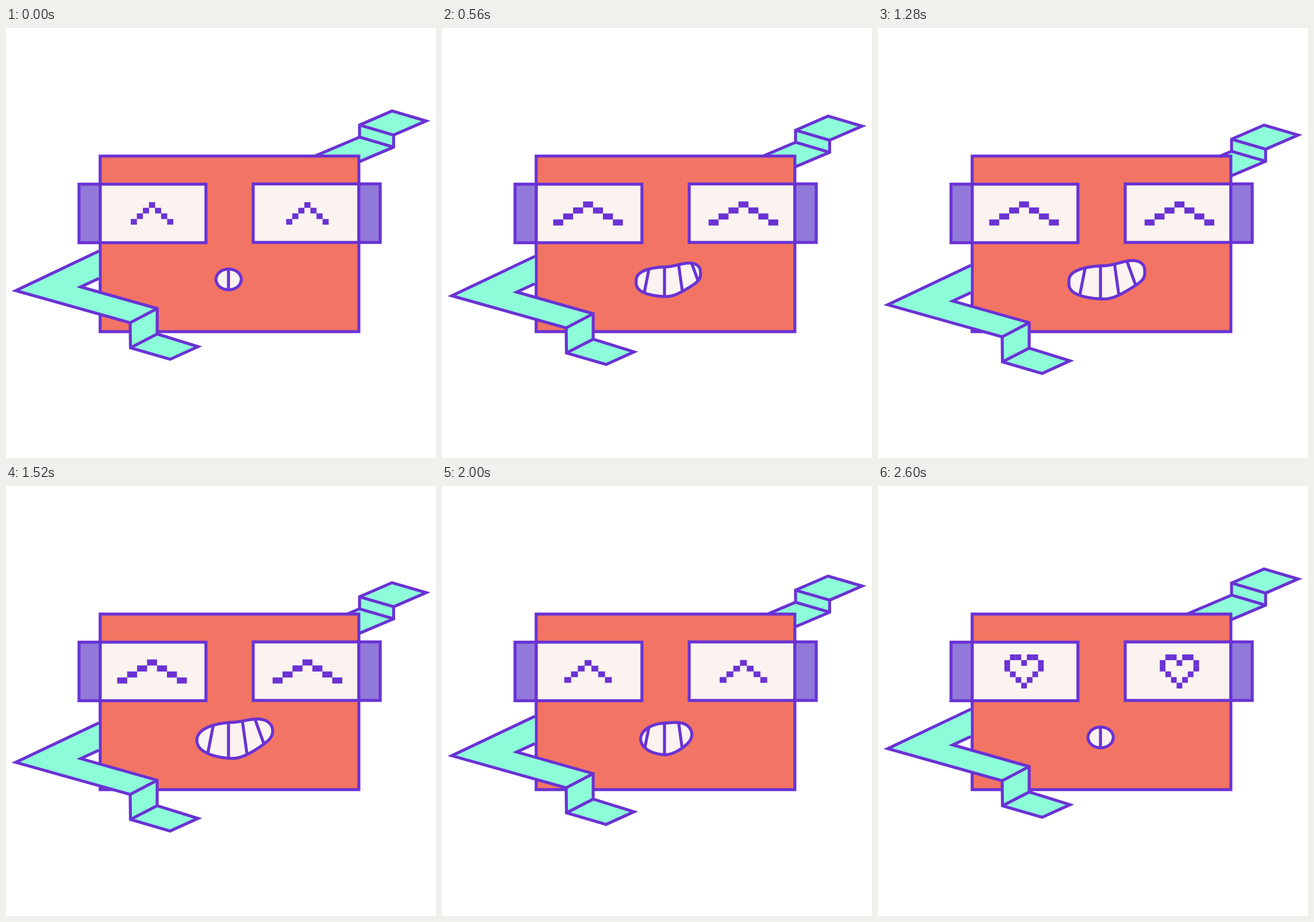
An HTML page with a canvas for the animation above (2640 ms loop, 748 by 748 pixels).

```html
<!DOCTYPE html>
<html>
<head>
<meta charset="utf-8">
<title>Laughing face</title>
<style>
html, body { margin: 0; width: 100%; height: 100%; overflow: hidden; background: #fff; }
canvas { display: block; }
</style>
</head>
<body>
<canvas id="stage" width="748" height="748"></canvas>
<script>
const ctx = document.getElementById('stage').getContext('2d');
const LOOP = 2640;
const INK = '#6a32d4', MINT = '#8dfdd9', CORAL = '#f27464', CREAM = '#fbf3f0', LILAC = '#9179d9';

const mix = (a, b, k) => a + (b - a) * k;
const ease = x => (1 - Math.cos(Math.PI * Math.min(1, Math.max(0, x)))) / 2;
// Rises from 0 to 1, then falls back to 0.
const pulse = (t, up, rise, down, fall) => ease((t - up) / rise) - ease((t - down) / fall);

function trace(points) {
  ctx.beginPath();
  for (const [x, y] of points) ctx.lineTo(x, y);
}

function line(...points) {
  trace(points);
  ctx.stroke();
}

function box(x, y, w, h, fill) {
  ctx.fillStyle = fill;
  ctx.fillRect(x, y, w, h);
  ctx.strokeRect(x, y, w, h);
}

// A folded strip between two rails, with crease lines across two of its corners.
function ribbon(outer, inner, crease, dy) {
  ctx.save();
  ctx.translate(0, dy);
  trace([...outer, ...[...inner].reverse()]);
  ctx.fillStyle = MINT;
  ctx.fill();
  ctx.stroke();
  for (const i of [crease, crease + 1]) line(outer[i], inner[i]);
  ctx.restore();
}

function backArm(dy) {
  const rail = [[480, 247], [615, 189.8], [615, 168.8], [671.5, 144.3]];
  ribbon(rail, rail.map(([x, y]) => [x + 59.3, y + 17.4]), 1, dy);
}

function frontArm(dy) {
  ribbon(
    [[161.5, 388.2], [17, 456.8], [216, 512.7], [216.5, 556.2], [285.5, 576.3]],
    [[161.5, 435.7], [130, 450.3], [263, 488], [263, 532.3], [334, 554.3]],
    2, dy);
}

function glasses() {
  box(127, 271.7, 37, 101.8, LILAC);
  box(164, 271.7, 183.8, 101.8, CREAM);
  box(430, 271.2, 183.8, 101.8, CREAM);
  box(613.8, 271.2, 37.2, 101.8, LILAC);
}

function eye(cx, t) {
  const wide = pulse(t, 0, 320, 1800, 280);
  const isCaret = t < 2080;
  const w = isCaret ? mix(10.55, 17.3, wide) : 9.75;
  const h = isCaret ? mix(9.75, 10.45, wide) : 9.85;
  const top = isCaret ? mix(303, 301.7, wide) : 293;
  for (let i = -3; i <= 3; i++) {
    const d = Math.abs(i);
    const rows = isCaret ? [d] : [d % 3 ? 0 : 1, 5 - d];
    for (const row of rows) ctx.fillRect(cx + (i - 0.5) * w, top + row * h, w + 0.1, h + 0.1);
  }
}

// An oval that opens into a grin: wider, squarer and lifted on the right.
function mouthOutline(t) {
  const open = pulse(t, 0, 820, 1486, 1046);
  const round = pulse(t, 1100, 660, 1900, 740);
  const cx = mix(387.3, 398, open * open), rx = mix(22, 66, open);
  const cy = mix(437.3, 442.5, open), ry = mix(18, 28.2, open) + 4.5 * round;
  const lift = 19 * open * (1 - 0.2 * round);
  const power = mix(1, 0.65, open * (1 - round));
  const points = [];
  for (let i = 0; i < 180; i++) {
    const a = i * Math.PI / 90, u = Math.cos(a), s = Math.sin(a);
    const half = ry * Math.sign(s) * Math.abs(s) ** power;
    points.push([cx + rx * u, cy + half - lift * ease((u + 0.1) / 1.1)]);
  }
  return points;
}

function mouth(t) {
  const outline = mouthOutline(t);
  ctx.save();
  trace(outline);
  ctx.fillStyle = CREAM;
  ctx.fill();
  ctx.clip();
  line([361, 414], [350, 470]);
  line([387, 400], [387, 480]);
  line([410.5, 404], [420, 472]);
  line([431, 400], [451, 455]);
  ctx.restore();
  trace(outline);
  ctx.closePath();
  ctx.stroke();
}

function draw(t) {
  const sway = 24.8 * pulse(t, 0, 1360, 1360, 1280);
  ctx.fillStyle = '#fff';
  ctx.fillRect(0, 0, 748, 748);
  ctx.strokeStyle = INK;
  ctx.lineWidth = 5.2;
  backArm(sway);
  box(163.8, 222.8, 450, 305.4, CORAL);
  glasses();
  ctx.fillStyle = INK;
  eye(254, t);
  eye(524.3, t);
  mouth(t);
  frontArm(sway);
}

function tick() {
  draw(performance.now() % LOOP);
  requestAnimationFrame(tick);
}
tick();
</script>
</body>
</html>
```
